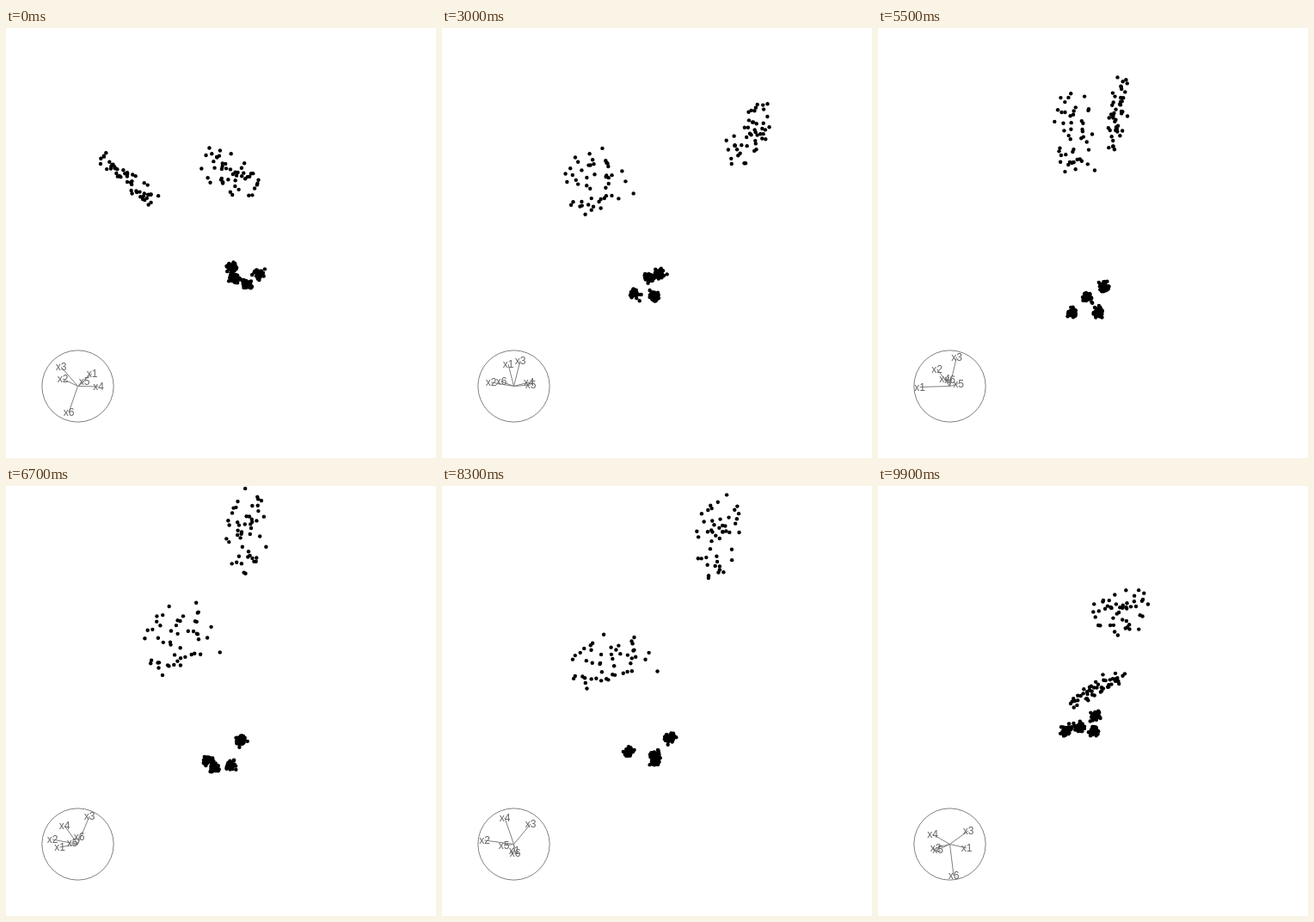
Recreate the animation shown at these times as an HTML page with a canvas. Size 500 px wide and 500 px high, loop 10000 ms.

```html
<!DOCTYPE html>
<html lang="en">
<head>
<meta charset="utf-8">
<title>Grand tour of six variables</title>
<style>
  html, body { margin: 0; width: 100%; height: 100%; overflow: hidden; background: #fff; }
  canvas { display: block; }
</style>
</head>
<body>
<canvas id="stage" width="500" height="500"></canvas>
<script>
const ctx = document.getElementById('stage').getContext('2d');
const LOOP = 10000, STEP = 100, DIMS = 6;
const MIDDLE = 250, HUB = [83.5, 416.5], RADIUS = 41.67;

// Views of the tour: time, then where x1..x6 point across and up, in pixels.
const views = [
  [0, [16.5, -17.5, -19.5, 24, 7.5, -10.5], [14.5, 8.5, 22.5, -.5, 5.5, -30.5]],
  [1300, [-1.5, -29.5, 2.5, 14, 2.5, -26.5], [31.5, 16.5, 5.5, 7.5, 5.5, -16.5]],
  [3000, [-6.5, -26.5, 7.5, 17.5, 19.5, -14.5], [25.5, 4.5, 29.5, 4.5, 1.5, 5.5]],
  [4200, [-22.5, 0, -.5, 16.5, 30, -2.5], [5.5, 23.5, 30.5, -2.5, 4.5, 4.5]],
  [5500, [-35, -15, 8, -6, 10, 0], [-1, 20, 34, 9, 3, 8]],
  [6700, [-21, -29.5, 13.5, -15.5, -6.5, 1.5], [-3.5, 5.5, 32.5, 21.5, 1.5, 8.5]],
  [8300, [.5, -34, 19.5, -10.5, -11.5, 1.5], [-7.5, 4.5, 23.5, 30.5, -1.5, -10.5]],
  [9200, [8, -25, 25, -8, -16, 5], [-6, 0, 20, 22, -4, -28]],
  [9900, [19.5, -16.5, 21.5, -20, -14, 4.5], [-4.5, -4.5, 15.5, 11.5, -6.5, -36.5]]
];
const times = views.map(view => view[0]);

// Smooth curve through rows of values at the view times.
function track(rows) {
  const last = times.length - 1;
  const slope = (i, k) => {
    const a = Math.max(i - 1, 0), b = Math.min(i + 1, last);
    return (rows[b][k] - rows[a][k]) / (times[b] - times[a]);
  };
  return t => {
    let i = 0;
    while (i < last - 1 && t >= times[i + 1]) i++;
    const span = times[i + 1] - times[i], u = (t - times[i]) / span, v = 1 - u;
    return rows[i].map((p, k) =>
      v * v * (1 + 2 * u) * p + u * u * (3 - 2 * u) * rows[i + 1][k] +
      span * u * v * (v * slope(i, k) - u * slope(i + 1, k)));
  };
}

// A turning direction: its length is eased apart, so that it does not shrink between views.
function turning(rows) {
  const direction = track(rows), size = track(rows.map(row => [Math.hypot(...row)]));
  return t => {
    const row = direction(t), scale = size(t)[0] / Math.hypot(...row);
    return row.map(p => p * scale);
  };
}
const across = turning(views.map(view => view[1]));
const up = turning(views.map(view => view[2]));

let seed = 11;
const random = () => (seed = (seed * 16807) % 2147483647) / 2147483647;
const noise = () => (random() + random() + random() - 1.5) * 2;

// Points in six dimensions: a tight ball, or a disc across two neighbouring dimensions.
function cluster(count, center, disc = 0, radius = 0) {
  return Array.from({ length: count }, () => {
    const point = center.map(c => c + noise() * .065);
    const r = radius * Math.sqrt(random()), angle = random() * 2 * Math.PI;
    point[disc] += r * Math.cos(angle);
    point[disc + 1] += r * Math.sin(angle);
    return point;
  });
}

const corner = [-.15, -.76, -1.77, -.63, 0, 0];
const shifted = axis => corner.map((c, k) => k === axis ? c + .88 : c);
const points = [
  ...cluster(48, [-.06, 3.05, 2.16, -.56, 0, -.06], 1, 1.3),
  [-.06, 1.25, 1.91, -.56, 0, -.06],
  ...cluster(48, [-.1, -.79, 4.01, 3.17, 0, 0], 2, 1.25),
  ...cluster(50, corner),
  ...[0, 1, 2].flatMap(axis => cluster(50, shifted(axis)))
];

const dot = (a, b) => a.reduce((sum, p, k) => sum + p * b[k], 0);

function circle(x, y, r) {
  ctx.beginPath();
  ctx.arc(x, y, r, 0, 2 * Math.PI);
}

function drawAxes(xs, ys) {
  ctx.strokeStyle = '#7f7f7f';
  ctx.fillStyle = '#666';
  circle(...HUB, RADIUS);
  ctx.stroke();
  for (let k = 0; k < DIMS; k++) {
    const x = HUB[0] + xs[k], y = HUB[1] - ys[k];
    ctx.beginPath();
    ctx.moveTo(...HUB);
    ctx.lineTo(x, y);
    ctx.stroke();
    ctx.fillText('x' + (k + 1), x, y + 4.2);
  }
}

function draw(now) {
  const t = Math.floor((now % LOOP) / STEP) * STEP;
  const xs = across(t), ys = up(t);
  ctx.fillStyle = '#fff';
  ctx.fillRect(0, 0, 500, 500);
  ctx.font = '12px "Liberation Sans", Arial, sans-serif';
  ctx.textAlign = 'center';
  drawAxes(xs, ys);
  ctx.fillStyle = '#000';
  for (const point of points) {
    circle(MIDDLE + dot(point, xs), MIDDLE - dot(point, ys), 2.2);
    ctx.fill();
  }
  requestAnimationFrame(draw);
}
draw(performance.now());
</script>
</body>
</html>
```
